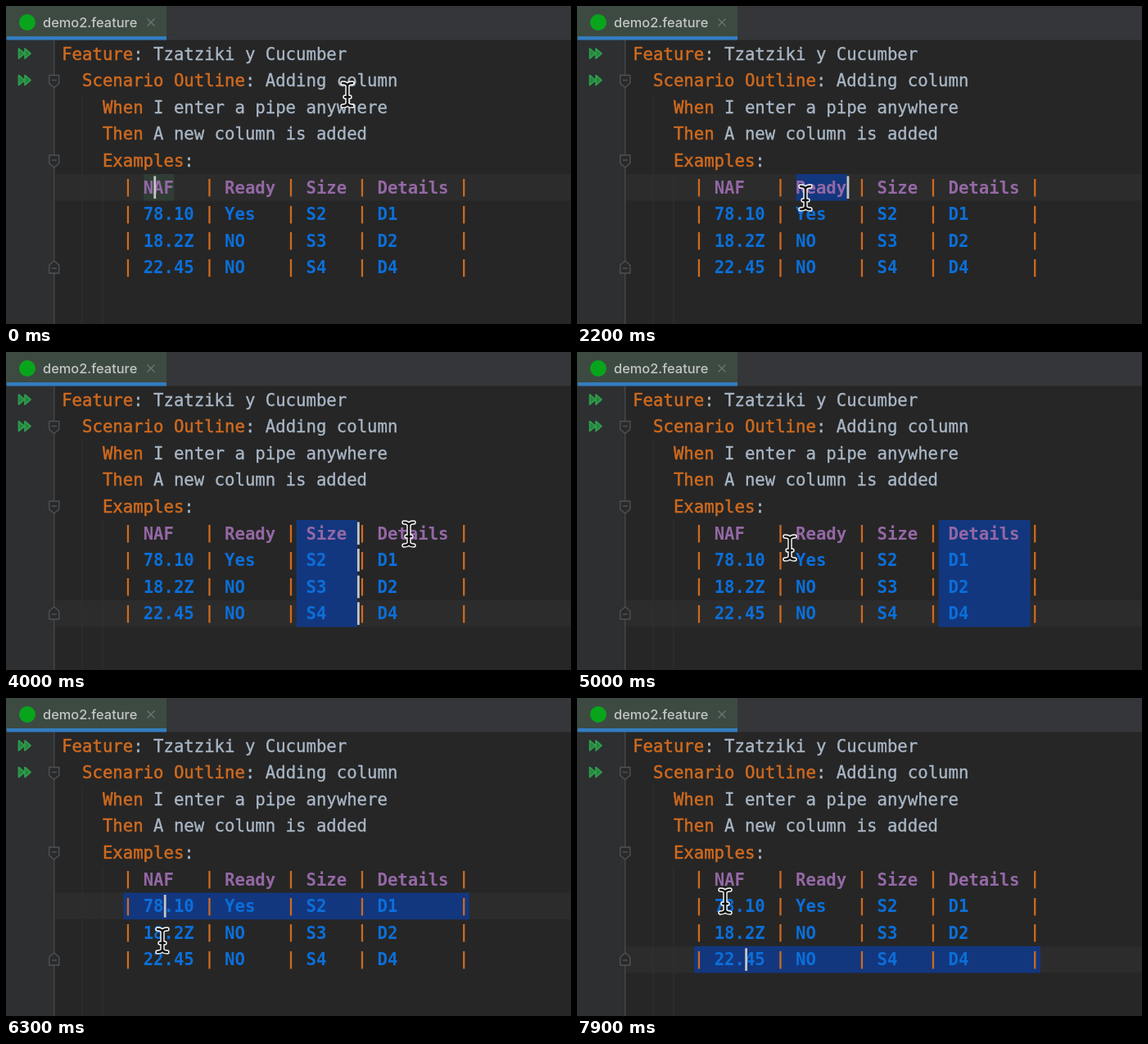
Write an HTML page that moves like this. It is 690 px wide and 388 px high and loops after 8 s.

```html
<!DOCTYPE html>
<html lang="en">
<head>
<meta charset="utf-8">
<title>Table selection</title>
<style>
  html, body { margin: 0; width: 100%; height: 100%; overflow: hidden; background: #262626; }
  svg { display: block; width: 100%; height: 100%; }
  .code text { font: 20.65px "DejaVu Sans Mono", monospace; white-space: pre; }
  .code .plain { fill: #a9b7c6; stroke: #a9b7c6; stroke-width: .35px; }
  .code .keyword { fill: #cf6a1f; stroke: #cf6a1f; stroke-width: .5px; }
  .code .pipe { fill: #cf6a1f; font-weight: bold; }
  .code .head { fill: #9468a5; font-weight: bold; }
  .code .value { fill: #0b6fda; font-weight: bold; }
  .tab { font: 500 16.4px Inter, sans-serif; fill: #c3c6c5; }
</style>
</head>
<body>
<svg id="stage" viewBox="0 0 690 388">
  <rect width="690" height="388" fill="#262626"/>
  <rect y="41" width="59" height="347" fill="#2d2f31"/>
  <rect id="band" x="60" width="630" height="32.6" fill="#2c2c2c"/>
  <path d="M93 107V388M118 205V388" stroke="#303030"/>
  <path d="M58.8 41V388" stroke="#484a4c" stroke-width="1.3"/>

  <rect width="690" height="41.400" fill="#343639"/>
  <rect width="196" height="41" fill="#3d4a42"/>
  <rect x="1" y="37" width="195" height="4.5" fill="#337dc0"/>
  <circle cx="26" cy="20" r="10" fill="#08a51c"/>
  <text class="tab" x="45" y="26">demo2.feature</text>
  <path d="M172.500 15.500l9 9m0-9l-9 9" stroke="#6d7371" stroke-width="1.4"/>

  <g id="gutter" stroke-linejoin="round"></g>
  <g id="selection"></g>
  <g id="code" class="code"></g>
  <g id="carets" fill="#c4c6c8"></g>
  <g id="mouse" fill="none" stroke-linecap="round">
    <path d="M-6-14Q-1-14 0-11Q1-14 6-14M0-11V11M-6 14Q-1 14 0 11Q1 14 6 14M-3 3H3" stroke="#fff" stroke-width="5.4"/>
    <path d="M-6-14Q-1-14 0-11Q1-14 6-14M0-11V11M-6 14Q-1 14 0 11Q1 14 6 14M-3 3H3" stroke="#111" stroke-width="2.6"/>
  </g>
</svg>
<script>
const LOOP = 8000, STEP = 100, BLINK = 500;
const CHAR = 12.43, LINE = 32.6, LEFT = 68.2, TOP = 42;
const FIRST = 5, LAST = 8;
const $ = id => document.getElementById(id);
const colX = col => LEFT + col * CHAR;
const rowY = row => TOP + row * LINE;

function add(parent, tag, attrs, text = "") {
  const node = document.createElementNS("http://www.w3.org/2000/svg", tag);
  for (const key in attrs) node.setAttribute(key, attrs[key]);
  node.textContent = text;
  parent.append(node);
}

function write(row, col, text, type) {
  const baseline = type === "pipe" ? 22 : 23.5;
  add($("code"), "text", { x: colX(col), y: rowY(row) + baseline, class: type }, text);
}

function drawCode() {
  const lines = [
    [0, "Feature", ":", "Tzatziki y Cucumber"],
    [2, "Scenario Outline", ":", "Adding column"],
    [4, "When", "", "I enter a pipe anywhere"],
    [4, "Then", "", "A new column is added"],
    [4, "Examples", ":", ""]
  ];
  lines.forEach(([col, keyword, colon, rest], row) => {
    const end = col + keyword.length;
    write(row, col, keyword, "keyword");
    write(row, end, colon, "plain");
    write(row, end + colon.length + 1, rest, "plain");
  });
  const table = ["NAF Ready Size Details", "78.10 Yes S2 D1", "18.2Z NO S3 D2", "22.45 NO S4 D4"];
  const pipes = [6, 14, 22, 29, 39];
  table.forEach((line, i) => {
    pipes.forEach(col => write(FIRST + i, col, "|", "pipe"));
    line.split(" ").forEach((cell, k) => write(FIRST + i, pipes[k] + 2, cell, i ? "value" : "head"));
  });
}

function drawGutter() {
  const gutter = $("gutter");
  for (const y of [58, 90.500]) {
    add(gutter, "path", {
      d: `M15.500 ${y - 6}l7 6l-7 6zM23 ${y - 6}l7 6l-7 6z`,
      fill: "#25843f", stroke: "#2f9c4b", "stroke-width": 1.7
    });
  }
  for (const [y, dir] of [[91.500, 1], [189, 1], [319, -1]]) {
    add(gutter, "path", {
      d: "M-6-7H6V3L0 8L-6 3ZM-3-1H3", transform: `translate(58.8 ${y}) scale(1 ${dir})`,
      fill: "#292a2b", stroke: "#4f5153", "stroke-width": 1.4
    });
  }
}

// Each state: where it starts, the selected columns and rows, and the caret column.
const cell = (at, from, to) => ({ at, from, to, top: FIRST, end: FIRST, caret: to });
const column = (at, from, to) => ({ at, from, to, top: FIRST, end: LAST, caret: to, block: true });
const click = (at, row, caret) => ({ at, from: 0, to: 0, top: row, end: row, caret });
const wholeRow = (at, row, caret) => ({ at, from: 6, to: 40, top: row, end: row, caret });
const states = [
  { ...cell(0, 8, 11), caret: 9, word: true },
  cell(1000, 8, 11), column(1500, 7, 14),
  cell(2000, 16, 21), column(2500, 15, 22),
  cell(3000, 24, 28), column(3600, 23, 29),
  cell(4200, 31, 38), column(4500, 30, 39),
  click(5600, 6, 10), wholeRow(6000, 6, 10),
  click(6600, 7, 10), wholeRow(6800, 7, 10),
  click(7300, 8, 11), wholeRow(7500, 8, 11)
];

const path = [
  [0, 417, 108], [200, 417, 108], [900, 194, 215], [1500, 194, 216],
  [2000, 277, 229], [2200, 279, 234], [2500, 279, 232], [3000, 386, 225],
  [3600, 388, 224], [4000, 492, 222], [4600, 493, 225], [5000, 260, 239],
  [5500, 193, 256], [6000, 192, 258], [6300, 191, 296], [6800, 192, 288],
  [7200, 205, 328], [7550, 207, 354], [7900, 181, 248]
];

function mouseAt(t) {
  const i = path.findIndex(point => point[0] > t);
  if (i < 0) return path[path.length - 1].slice(1);
  const [t0, x0, y0] = path[i - 1], [t1, x1, y1] = path[i];
  const p = (t - t0) / (t1 - t0), eased = p * p * (3 - 2 * p);
  return [x0 + (x1 - x0) * eased, y0 + (y1 - y0) * eased];
}

function render(t) {
  const state = states.findLast(s => s.at <= t);
  const { from, to, top, end } = state;
  $("band").setAttribute("y", rowY(end));

  $("selection").replaceChildren();
  add($("selection"), "rect", {
    x: colX(from) + .5, y: rowY(top), width: (to - from) * CHAR, height: (end - top + 1) * LINE,
    fill: state.word ? "#303d34" : "#13377f"
  });

  $("carets").replaceChildren();
  if ((t - state.at) % (2 * BLINK) < BLINK) {
    for (let row = state.block ? top : end; row <= end; row++) {
      add($("carets"), "rect", {
        x: colX(state.caret) + .3, y: rowY(row) + 2.5, width: 2.8, height: LINE - 5
      });
    }
  }
  $("mouse").setAttribute("transform", `translate(${mouseAt(t)})`);
}

function tick() {
  render(Math.floor(performance.now() % LOOP / STEP) * STEP);
  requestAnimationFrame(tick);
}

drawCode();
drawGutter();
tick();
</script>
</body>
</html>
```
